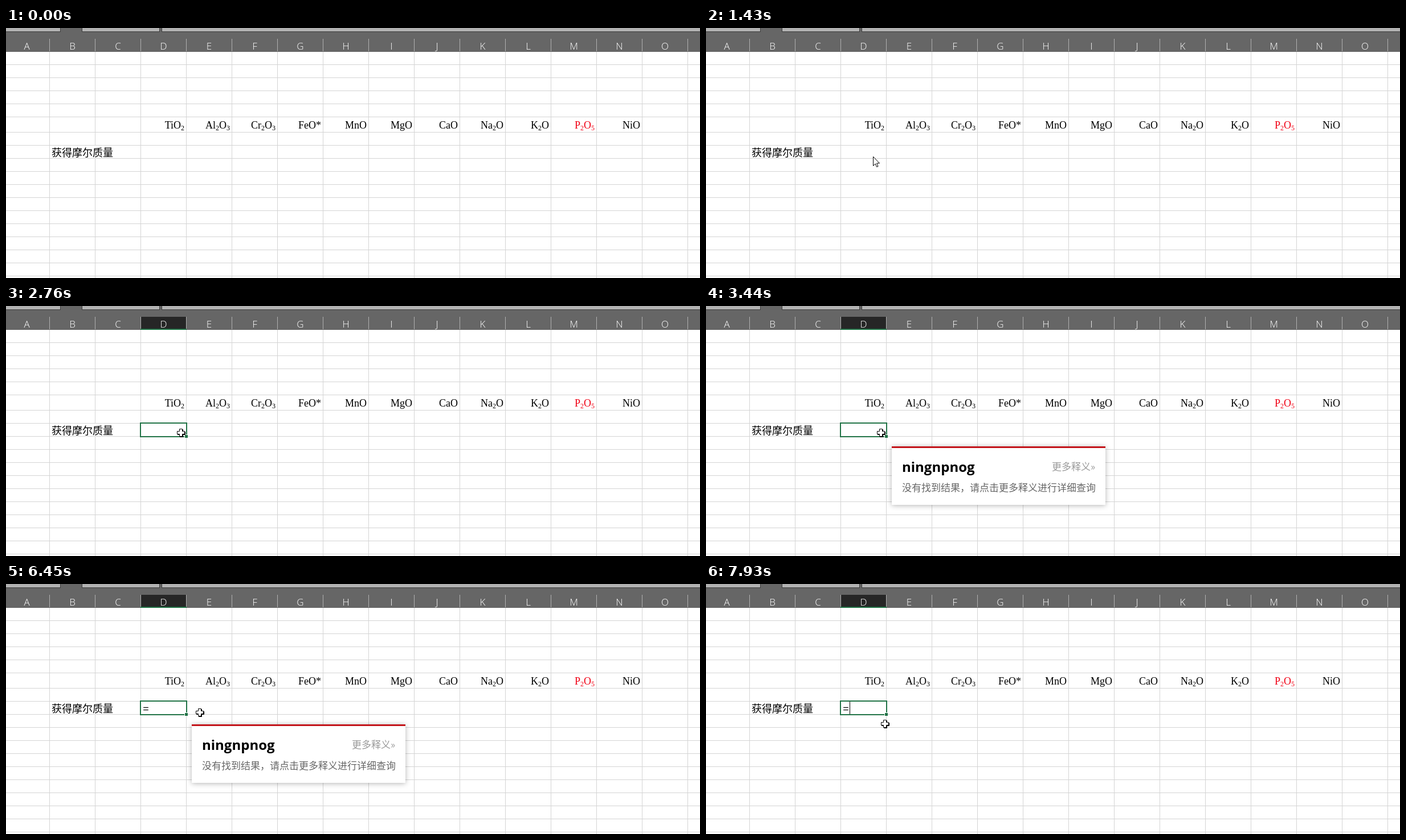
Write an HTML page that moves like this. It is 1218 px wide and 440 px high and loops after 8 s.

```html
<!DOCTYPE html>
<html lang="zh">
<head>
<meta charset="utf-8">
<style>
  html, body { margin: 0; width: 100%; height: 100%; overflow: hidden; background: #fff; }
  svg { display: block; width: 1218px; height: 440px; }
  text { font-family: "Noto Sans CJK SC", "Noto Sans CJK", sans-serif; font-size: 18px; white-space: pre; }
  .head { font: 300 17px "Open Sans", "Noto Sans", sans-serif; fill: #fff; text-anchor: middle; }
  .cell { font-family: "Liberation Serif", "Times New Roman", serif; text-anchor: end; }
  .sub { font-size: 12px; }
  .word { font: bold 24px "Open Sans", "Noto Sans", sans-serif; }
  .note { font-size: 17px; fill: #666; }
  .more { font-size: 17px; fill: #999; }
  .card { filter: drop-shadow(0 1px 5px rgba(0, 0, 0, .3)); }
</style>
</head>
<body>
<svg viewBox="0 0 1218 440">
  <g id="sheet"></g>
  <g id="sel">
    <rect x="237" y="19" width="79" height="21" fill="#262626"/>
    <rect x="236" y="40" width="81" height="2" fill="#217346"/>
    <text class="head" x="276.5" y="38">D</text>
    <rect x="236" y="206" width="81" height="24" fill="#fff" stroke="#217346" stroke-width="2"/>
    <rect x="313" y="226" width="6" height="6" fill="#fff"/>
    <rect x="314" y="227" width="5" height="5" fill="#217346"/>
  </g>
  <text id="eq" x="240.5" y="226">=</text>
  <rect id="caret" x="252" y="207" width="1" height="22"/>
  <g id="pop">
    <rect class="card" x="326" y="247" width="375" height="103" fill="#fff"/>
    <rect x="326" y="247" width="375" height="3" fill="#c4161c"/>
    <text class="word" x="344" y="292">ningnpnog</text>
    <text class="more" x="607" y="289">更多释义»</text>
    <text class="note" x="344" y="326">没有找到结果，请点击更多释义进行详细查询</text>
  </g>
  <path id="arrow" d="M.5 .5V16.5L4.2 13L6.6 18.5L9 17.5L6.6 12H11.5Z" fill="#fff" stroke="#000"/>
  <g id="plus" stroke="#000">
    <path d="M-2 -6h5v4h4v5h-4v4h-5v-4h-4v-5h4z"/>
    <path d="M-3 -7h5v4h4v5h-4v4h-5v-4h-4v-5h4z" fill="#fff"/>
  </g>
  <path id="beam" d="M-3 -7.5H-1L0 -6.5L1 -7.5H3M0 -6.5V6.5M-3 7.5H-1L0 6.5L1 7.5H3" fill="none" stroke="#000"/>
</svg>
<script>
const LOOP = 8000, TICK = 77, COL = 80, ROW = 23;
const $ = id => document.getElementById(id);
const rect = (x, y, w, h, fill) =>
  `<rect x="${x}" y="${y}" width="${w}" height="${h}" fill="${fill}"/>`;

// digits drop below the baseline, letters return to it
const formula = name => name.match(/\d|\D+/g).map((part, i) =>
  /\d/.test(part) ? `<tspan class="sub" dy="3">${part}</tspan>`
                  : `<tspan dy="${i ? -3 : 0}">${part}</tspan>`).join('');

function bar(x, w) {
  return rect(x, 0, w, 7, '#3c3c3c') + rect(x + 1, 0, w - 2, 6, '#b2b2b2');
}

function drawSheet() {
  const line = '#d4d4d4';
  let s = '';
  for (let i = 1; i < 18; i++) s += rect(0, 41 + i * ROW + (i > 5 ? 4 : 0), 1218, 1, line);
  for (let x = 76; x < 1218; x += COL) s += rect(x, 41, 1, 399, line);
  s += rect(156, 207, 1, 22, '#fff');

  s += rect(0, 0, 1218, 42, '#666') + bar(-1, 97) + bar(133, 137) + bar(273, 946);
  for (let i = 0; i < 15; i++) {
    s += rect(76 + i * COL, 19, 1, 22, '#b0b0b0');
    s += `<text class="head" x="${36.5 + i * COL}" y="38">${String.fromCharCode(65 + i)}</text>`;
  }

  'TiO2 Al2O3 Cr2O3 FeO* MnO MgO CaO Na2O K2O P2O5 NiO'.split(' ').forEach((name, i) => {
    const fill = name === 'P2O5' ? '#f00014' : '#000';
    s += `<text class="cell" x="${313 + i * COL}" y="177" fill="${fill}">${formula(name)}</text>`;
  });
  s += '<text x="80" y="226">获得摩尔质量</text>';
  $('sheet').innerHTML = s;
}

const linear = u => u;
const easeOut = u => 1 - (1 - u) ** 1.9;
const smooth = u => u * u * (3 - 2 * u);

// each move follows a curve: start point, control point, end point
const moves = [
  { shape: 'arrow', start: 510, end: 1280, ease: easeOut, path: [[742, 428], [518, 331], [294, 234]] },
  { shape: 'arrow', start: 1360, end: 1430, ease: linear, path: [[293, 230], [293, 228], [293, 226]] },
  { shape: 'plus', start: 1750, end: 2520, ease: smooth, path: [[300, 240], [480, 540], [303, 220]] },
  { shape: 'plus', start: 2590, end: 2760, ease: linear, path: [[306, 223], [306, 223], [307, 223]] },
  { shape: 'beam', start: 3690, end: 3690, ease: linear, path: [[309, 223], [309, 223], [309, 223]] },
  { shape: 'plus', start: 6450, end: 7000, ease: easeOut, path: [[340, 226], [-58, 122], [513, 219]] },
  { shape: 'plus', start: 7150, end: 7930, ease: smooth, path: [[519, 205], [480, 198], [314, 246]] }
];

function pointer(t) {
  const move = moves.filter(m => m.start <= t).pop();
  if (!move) return null;
  const { shape, start, end, ease, path: [a, b, c] } = move;
  const steps = Math.max(1, Math.round((end - start) / TICK));
  const done = (t - start + 4) / Math.max(1, end - start);
  const u = ease(Math.min(1, Math.floor(done * steps) / steps));
  const at = i => Math.floor((1 - u) ** 2 * a[i] + 2 * u * (1 - u) * b[i] + u * u * c[i] + 1e-6);
  const half = shape === 'arrow' ? 0 : .5;
  return { shape, x: at(0) + half, y: at(1) + half };
}

// blink with short fades
function caret(t) {
  if (t < 3610) return 0;
  const wave = Math.cos((t - 3808) / 1063 * 2 * Math.PI);
  return Math.min(1, Math.max(0, .5 + 1.3 * wave));
}

const show = (id, on) => { $(id).style.display = on ? '' : 'none'; };

function render(t) {
  show('sel', t >= 2440);
  show('eq', t >= 3610);
  show('pop', t >= 3440 && t < 6610);
  $('caret').style.opacity = caret(t);
  const p = pointer(t);
  for (const id of ['arrow', 'plus', 'beam']) {
    const on = p !== null && p.shape === id;
    show(id, on);
    if (on) $(id).setAttribute('transform', `translate(${p.x} ${p.y})`);
  }
}

drawSheet();
render(0);
const begin = performance.now();
function frame() {
  render((performance.now() - begin) % LOOP);
  requestAnimationFrame(frame);
}
requestAnimationFrame(frame);
</script>
</body>
</html>
```
